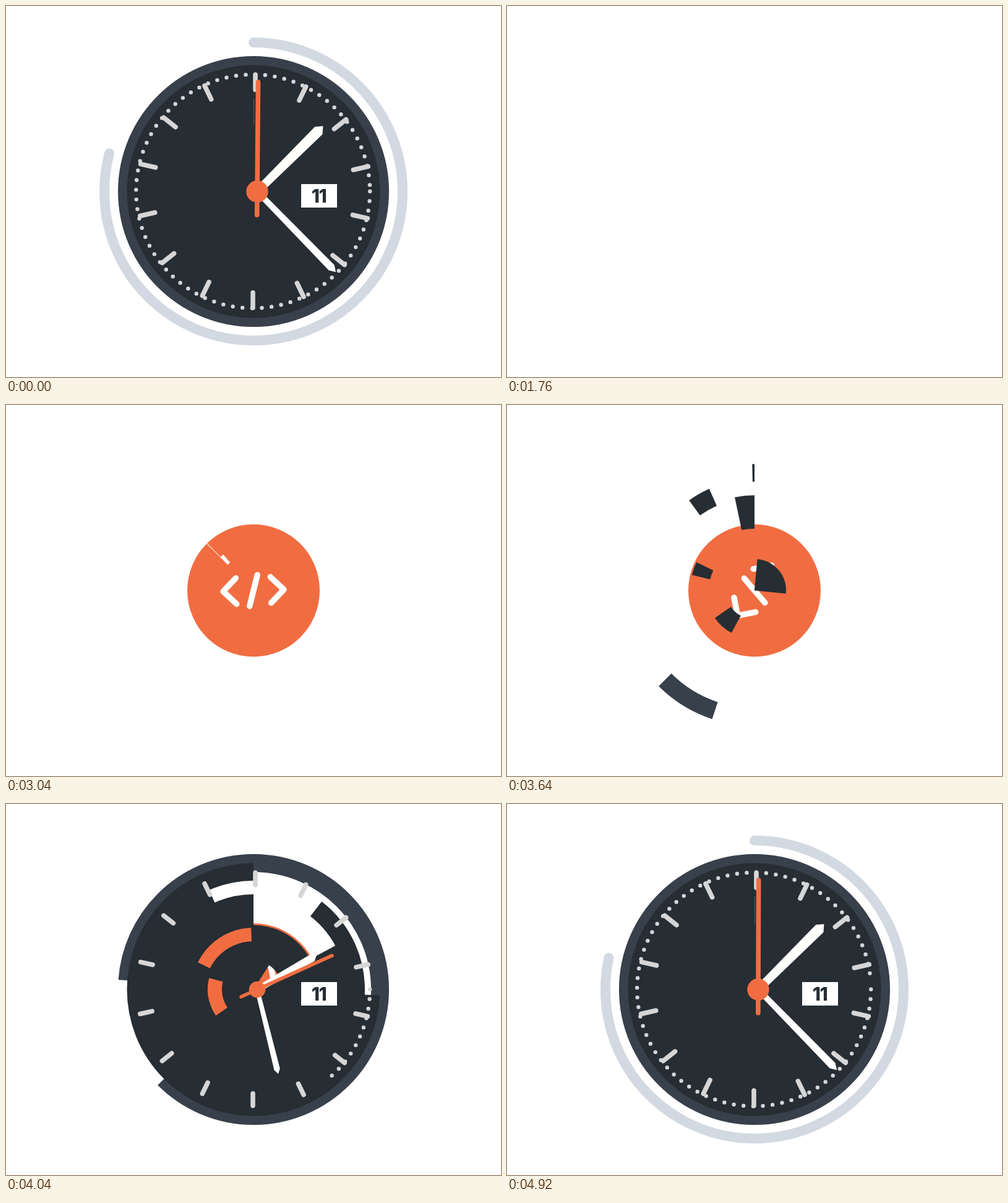
These frames come from a looping animation (800x600 px, 4.96 s). An HTML page with a canvas:

```html
<!DOCTYPE html>
<html lang="en">
<head>
<meta charset="utf-8">
<title>Clock and code badge</title>
<style>
  html, body { margin: 0; width: 100%; height: 100%; overflow: hidden; background: #fff; }
  canvas { display: block; }
</style>
</head>
<body>
<canvas id="stage" width="800" height="600"></canvas>
<script>
const ctx = document.getElementById('stage').getContext('2d');
const LOOP = 4960, CUT = 1760, SWEEP = 1080;
const ORANGE = '#f16d41', DARK = '#262d33', RIM = '#38404b';
const LIGHT = '#d2d9e2', GREY = '#d6d6d6', WHITE = '#fff';

// inner radius, outer radius, start angle (clockwise from 12), start time
const badgeRings = [
  [0, 30, 315, 1790], [28, 59, 315, 1927], [58, 77, 315, 2159], [76, 107, 315, 2031]
];
const faceRings = [
  [190, 219, 225, 3479, RIM], [176, 204.5, 0, 3602], [150, 180, -24, 3523],
  [100, 154, 0, 3523], [74, 104.3, -64, 3523], [46.5, 78, 235.3, 3479]
];

const rad = deg => deg * Math.PI / 180;
const progress = (t, start, length) => Math.min(1, Math.max(0, (t - start) / length));
const outCubic = u => 1 - (1 - u) ** 3;
const inOut = (u, p) => u < .5 ? (2 * u) ** p / 2 : 1 - (2 - 2 * u) ** p / 2;

// cubic-bezier(.41, 0, .04, 1)
function snap(x) {
  if (x <= 0 || x >= 1) return x;
  let lo = 0, hi = 1, s;
  for (let i = 0; i < 24; i++) {
    s = (lo + hi) / 2;
    const r = 1 - s;
    if (1.23 * s * r * r + .12 * s * s * r + s ** 3 < x) lo = s; else hi = s;
  }
  return s * s * (3 - 2 * s);
}

function placed(x, y, angle, scale, paint) {
  ctx.save();
  ctx.translate(x, y);
  ctx.rotate(rad(angle));
  ctx.scale(scale, scale);
  paint();
  ctx.restore();
}

function line(points, width, color, cap = 'round') {
  ctx.beginPath();
  points.forEach(([x, y]) => ctx.lineTo(x, y));
  ctx.lineWidth = width;
  ctx.strokeStyle = color;
  ctx.lineCap = cap;
  ctx.lineJoin = 'round';
  ctx.stroke();
}

function fillShape(points, color) {
  ctx.beginPath();
  points.forEach(([x, y]) => ctx.lineTo(x, y));
  ctx.fillStyle = color;
  ctx.fill();
}

function disc(x, y, r, color) {
  ctx.beginPath();
  ctx.arc(x, y, r, 0, 2 * Math.PI);
  ctx.fillStyle = color;
  ctx.fill();
}

// Ring growing counterclockwise
function ring(inner, outer, start, p, color) {
  if (p <= 0) return;
  const from = rad(start - 90);
  ctx.beginPath();
  ctx.arc(400, 300, (inner + outer) / 2, from, from - 2 * Math.PI * p, true);
  ctx.lineWidth = outer - inner;
  ctx.strokeStyle = color;
  ctx.lineCap = 'butt';
  ctx.stroke();
}

function badge(t) {
  for (const [inner, outer, start, begin] of badgeRings)
    ring(inner, outer, start, snap(progress(t, begin, SWEEP)), ORANGE);
  const parts = [
    [[-28, -21], [-49, 0], [-28, 21]],
    [[7, -25], [-7, 25]],
    [[28, -21], [49, 0], [28, 21]]
  ];
  const turn = -56 * inOut(progress(t, 2880, 800), 3);
  placed(400, 300, turn, 1, () => parts.forEach((points, i) => {
    const p = snap(progress(t, 2054 + 157 * i, 560));
    if (p > 0) line(points.map(([x, y]) => [x, y + 150 * (1 - p)]), 9.5, WHITE);
  }));
}

function marks(t) {
  const dots = outCubic(progress(t, 3979, 1253)) * 361;
  for (let a = 0; a < Math.min(dots, 358); a += 4.758)
    disc(399.2 + 189 * Math.cos(rad(a)), 299.8 + 189 * Math.sin(rad(a)), 3.2, GREY);

  const grow = outCubic(progress(t, 3872, 400));
  if (grow > 0) for (let i = 0; i < 14; i++)
    placed(401, 299.5, i * 360 / 14, 1, () =>
      line([[2, -188.5], [2, -188.5 + 24.5 * grow]], 7.6, GREY));
}

function dateBox(t) {
  const p = outCubic(progress(t, 3840, 160));
  if (p <= 0) return;
  placed(506, 307, 0, p, () => {
    ctx.fillStyle = WHITE;
    ctx.fillRect(-29, -19, 58, 38);
    ctx.fillStyle = DARK;
    ctx.font = '800 30px Inter, Roboto, sans-serif';
    ctx.letterSpacing = '-1.5px';
    ctx.textAlign = 'center';
    ctx.fillText('11', -.5, 11);
  });
}

function hands(t) {
  const left = 1 - outCubic(progress(t, 3897, 800));
  const size = start => outCubic(progress(t, start, 400));
  const pointer = (angle, scale, base, half, shoulder, tip, color) =>
    placed(406, 300, angle, scale, () => fillShape(
      [[-base, 0], [-half, -shoulder], [0, -tip], [half, -shoulder], [base, 0]], color));

  pointer(45.2 + 27 * left, size(3897), 6.5, 8.7, 140, 150, '#fffffb');
  pointer(135.7 + 55 * left, size(3885), 4.5, 6.2, 172, 182, WHITE);

  const ticks = 3.9 * inOut(progress(t, 4840, 480), 2) + 5.5 * inOut(progress(t, 5860, 500), 2);
  placed(406, 300, 119 * left + ticks, size(3893), () => {
    line([[0, -177], [0, 38]], 7.6, ORANGE);
    disc(0, 0, 17.7, ORANGE);
  });
}

function outerArc(t) {
  const p = outCubic(progress(t, 4067, 1253));
  if (p <= 0) return;
  ctx.beginPath();
  ctx.arc(400, 300, 241, rad(-90), rad(-90 + 291.7 * p));
  ctx.lineWidth = 16;
  ctx.strokeStyle = LIGHT;
  ctx.lineCap = 'round';
  ctx.stroke();
}

function face(t) {
  for (const [inner, outer, start, begin, color = DARK] of faceRings)
    ring(inner, outer, start, snap(progress(t, begin, SWEEP)), color);
  const p = snap(progress(t, 3397, SWEEP));
  ring(0, 51, 119.4 - 95 * p, p, DARK);
  marks(t);
  dateBox(t);
  hands(t);
  outerArc(t);
}

function draw() {
  const now = performance.now() % LOOP;
  const t = now < CUT ? now + LOOP : now;
  ctx.fillStyle = WHITE;
  ctx.fillRect(0, 0, 800, 600);
  badge(t);
  face(t);
  requestAnimationFrame(draw);
}
draw();
</script>
</body>
</html>
```
